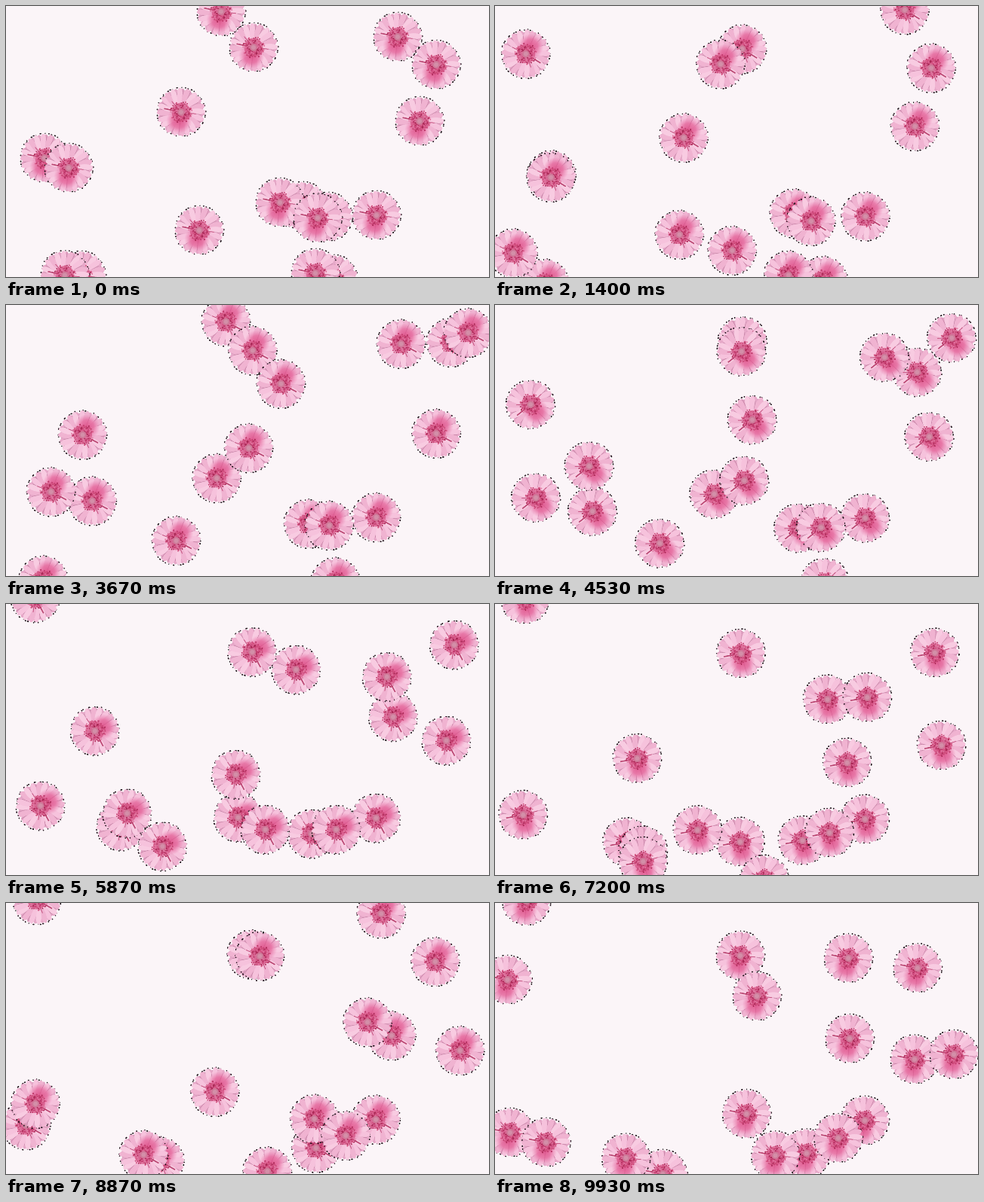
An HTML page with a canvas for the animation above (9990 ms loop, 640 by 360 pixels).

```html
<!DOCTYPE html>
<html lang="en">
<head>
<meta charset="utf-8">
<title>Drifting daisies</title>
<style>
html, body { margin: 0; width: 640px; height: 360px; overflow: hidden; background: #fbf5f8; }
canvas { display: block; }
</style>
</head>
<body>
<canvas id="stage" width="640" height="360"></canvas>
<script>
const LOOP = 9.99, FPS = 15, TAU = Math.PI * 2;
const TOP = -8.5, BOTTOM = 370, LEFT = 10, RIGHT = 630;
const SWING_PERIOD = 2.5, SWING_MIDDLE = .35, SWING_SIZE = 1.45;

// [x, y, vx, vy, ...re-entries]: x along the top edge, or y on a side edge for "fromSide" flowers
const fromTop = (...d) => ({ d, side: false });
const fromSide = (...d) => ({ d, side: true });
const flowers = [
  fromTop(519, 41, 42.2, 29.6, 247.8),
  fromTop(434, 363, .7, 1.3, 38.5),
  fromTop(393.5, 266, 1.95, 6.7),
  fromTop(51, 202, 17.25, 15.9),
  fromTop(83, 215, -6.35, 9.05),
  fromTop(256, 298, -8.3, 4.1),
  fromTop(328, 55, -.3, 1.5),
  fromSide(232, 141, 12.9, 24.3, 89.6),
  fromTop(285, 7.5, 10, 49.8, 320.5),
  fromTop(548, 153, 6.05, 4.85),
  fromTop(363, 261, -34.8, 45.6, 634),
  fromTop(427, 280, -27.2, 55.4, 420, 508.4),
  fromTop(491, 278, -.1, 1.1),
  fromTop(413, 281.5, 4.2, 3.1),
  fromSide(100, 358, 26.8, 48, 8.5, 214.7),
  fromSide(78, 357.5, -8.4, 7.9, 20.4),
  fromSide(570, 78, 53, 27.4, 321, 345, 113),
  fromTop(410, 355, -8.56, 20.5, 548.7)
];

function position({ d, side }, t) {
  let [x, y, vx, vy, ...entries] = d;
  for (;;) {
    const life = Math.min((BOTTOM - y) / vy, vx > 0 ? (RIGHT - x) / vx : Infinity);
    if (t < life) return [x + vx * t, y + vy * t];
    if (!entries.length) return null;
    t -= life;
    const entry = entries.shift();
    [x, y] = side ? [vx > 0 ? LEFT : RIGHT, entry] : [entry, TOP];
  }
}

let seed = 11;
const random = () => (seed = seed * 16807 % 2147483647) / 2147483647;

function makeFlower() {
  const size = 72, scale = 2;
  const canvas = document.createElement('canvas');
  canvas.width = canvas.height = size * scale;
  const g = canvas.getContext('2d');
  g.scale(scale, scale);
  g.translate(size / 2, size / 2);

  const ellipse = (r, rx, ry, angle, color) => {
    g.fillStyle = color;
    g.beginPath();
    g.ellipse(r * Math.cos(angle), r * Math.sin(angle), rx, ry, angle, 0, TAU);
    g.fill();
  };
  const streak = (angle, from, to, width, color) => {
    const c = Math.cos(angle), s = Math.sin(angle);
    g.strokeStyle = color;
    g.lineWidth = width;
    g.beginPath();
    g.moveTo(from * c, from * s);
    g.lineTo(to * c, to * s);
    g.stroke();
  };

  // dark flecks around the petal tips
  for (let i = 0; i < 42; i++) {
    ellipse(31.4 + random() * 1.4, .9, .6 + random() * .7, (i + random()) / 42 * TAU, '#21141c');
  }
  const petals = 20;
  ellipse(0, 29, 29, 0, '#dc9dbf');
  for (let i = 0; i < petals; i++) ellipse(20, 11.5, 4.3, (i + .5) / petals * TAU, '#e6a8c8');
  for (let i = 0; i < petals; i++) {
    const a = (i + random() * .4) / petals * TAU;
    ellipse(20.5, 11.4 + random(), 4.1, a, ['#f6c2dc', '#f0b3d1', '#f8cbe1'][i % 3]);
    streak(a + .16, 14, 24 + random() * 7, .8, '#c886a8');
  }

  // deeper pink on one side
  g.globalCompositeOperation = 'source-atop';
  const blush = g.createRadialGradient(12, 0, 0, 12, 0, 17);
  blush.addColorStop(0, 'rgba(220,72,130,.85)');
  blush.addColorStop(.55, 'rgba(226,88,145,.65)');
  blush.addColorStop(1, 'rgba(230,110,165,0)');
  g.fillStyle = blush;
  g.fillRect(-36, -36, 72, 72);
  g.globalCompositeOperation = 'source-over';
  streak(1.55, 9, 23, 1.6, '#b8436f');
  streak(2.2, 9, 19, 1, '#c4527f');
  streak(4.6, 9, 20, 1, '#c4527f');

  // stippled heart
  ellipse(0, 12.5, 12.5, 0, 'rgba(212,80,130,.7)');
  for (let i = 0; i < 150; i++) {
    const shade = ['#a92855', '#c43d70', '#e27aa3', '#d2517f'][i % 4];
    ellipse(5 + random() * 9.5, 1, .9, random() * TAU, shade);
  }
  ellipse(0, 5, 5, 0, '#cf7898');
  ellipse(0, 3, 3, 0, '#d38fa8');
  return canvas;
}

const sprite = makeFlower();
const ctx = document.getElementById('stage').getContext('2d');

function draw(now) {
  const t = Math.floor((now / 1000 % LOOP + .005) * FPS) / FPS;
  const angle = SWING_MIDDLE + SWING_SIZE * Math.cos(TAU * t / SWING_PERIOD);
  ctx.fillStyle = '#fbf5f8';
  ctx.fillRect(0, 0, 640, 360);
  for (const flower of flowers) {
    const p = position(flower, t);
    if (!p) continue;
    ctx.save();
    ctx.translate(...p);
    ctx.rotate(angle);
    ctx.drawImage(sprite, -36, -36, 72, 72);
    ctx.restore();
  }
}

let began;
function tick(now) {
  began ??= now;
  draw(now - began);
  requestAnimationFrame(tick);
}
draw(0);
requestAnimationFrame(tick);
</script>
</body>
</html>
```
